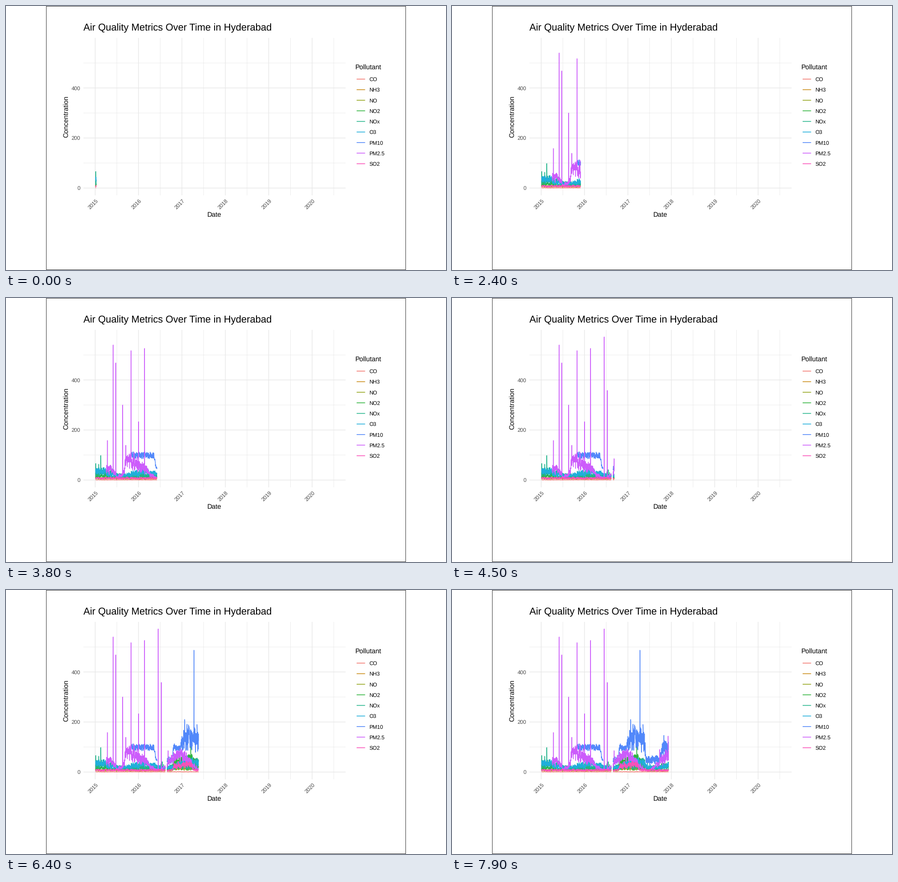
A matplotlib script that plays this animation: 966x580 px, repeating every 8000 ms.

```python
import numpy as np
import matplotlib.pyplot as plt
from matplotlib.animation import FuncAnimation
from matplotlib.patches import Rectangle

W, H, DPI = 966, 580, 100
FRAMES, INTERVAL = 80, 100
PT = 72 / DPI                       # points per pixel
X2015, YEAR = 195.7, 95.27          # pixel column of 2015, pixels per year
Y0, UNIT = 399.9, 0.5495            # pixel row of zero, pixels per unit
START, SPEED = 198.0, 3.51          # reveal front, pixels per frame
OUTAGE_END = 606                    # day on which the sensors come back

plt.rcParams["font.family"] = "Liberation Sans"
plt.rcParams["text.hinting"] = "none"

day = np.arange(3, 1085)
t = day / 365
xs = X2015 + YEAR * t


def during(a, b):
    """Soft on/off window between two times in years."""
    return (np.tanh((t - a) / 0.02) - np.tanh((t - b) / 0.02)) / 2


def season(peak):
    return np.cos(2 * np.pi * (t - peak))


def measure(level, spread, rng, gusts=0.0, since=0, outage=590, peaks=()):
    """Daily readings: a level with fast and slow noise, gusts and peaks."""
    n = len(day)
    slow = np.interp(day, day[::5], rng.uniform(-1, 1, len(day[::5])))
    noise = 0.7 * rng.uniform(-1, 1, n) + 0.45 * slow
    v = level * np.maximum(1 + spread * noise, 0.05)
    v *= np.where(rng.random(n) < gusts, rng.uniform(1.2, 2, n), 1)
    for d, top in peaks:
        v[d - day[0]] = top
    v[(day < since) | ((day > outage) & (day < OUTAGE_END))] = np.nan
    return Y0 - UNIT * v


# The polluted spell from late 2016 to spring 2017 shows in most series.
spell = during(1.79, 2.4)
late = during(2.75, 3.2)
SERIES = {
    "CO": ("#F2756D", dict(level=0.8, spread=0.8)),
    "NH3": ("#CB8E1B", dict(level=6.5 + 19 * spell, spread=0.4)),
    "NO": ("#93A61C", dict(level=8 + 6 * spell, spread=0.6, gusts=0.01)),
    "NO2": ("#2FB43C", dict(
        level=13 + 4 * season(0.1) + 30 * spell + 12 * late,
        spread=0.55, gusts=0.02)),
    "NOx": ("#22B48A", dict(
        level=17 + 12 * during(-0.1, 0.45) + 6 * spell + 6 * late,
        spread=0.65, gusts=0.05, peaks=[(6, 66), (48, 98)])),
    "O3": ("#20AEDB", dict(
        level=25 + 8 * season(0.12) + 9 * during(2, 2.4), spread=0.55)),
    "PM10": ("#5288FA", dict(
        level=48 + 51 * during(0.7, 1.38) + 51 * spell
        + 42 * during(2, 2.4) + 52 * late,
        spread=0.17 + 0.25 * during(1.6, 1.78) + 0.28 * during(2, 3.2),
        since=304, outage=520, peaks=[(831, 487)])),
    "PM2.5": ("#CC5CFB", dict(
        level=36 + 28 * season(0.95) + 26 * during(0.26, 0.47)
        + 32 * during(0.68, 0.83),
        spread=0.5, gusts=0.03, since=93,
        peaks=[(103, 158), (152, 540), (174, 468), (232, 300), (302, 517),
               (365, 233), (416, 526), (531, 572), (557, 358)])),
    "SO2": ("#FA50B8", dict(
        level=7.5 + 20 * during(1.8, 2.25), spread=0.6)),
}

fig = plt.figure(figsize=(W / DPI, H / DPI), dpi=DPI, facecolor="white")
ax = fig.add_axes([0, 0, 1, 1])
ax.set(xlim=(0, W), ylim=(H, 0))
ax.axis("off")


def stroke(x, y, color, px, z):
    return ax.plot(x, y, color=color, lw=px * PT, zorder=z, snap=False,
                   solid_capstyle="butt", solid_joinstyle="round")[0]


def label(x, y, s, px, color="black", **kw):
    ax.text(x, y, s, fontsize=px * PT, color=color, va="baseline",
            rotation_mode="anchor", **kw)


ax.add_patch(Rectangle((88.5, 0.5), 789, 579, fill=False, ec="#333333",
                       lw=PT, zorder=5, snap=False))

LEFT, RIGHT, TOP, BOTTOM = 170, 745.6, 70, 416
GREY, TICK = "#E8E8E8", "#4D4D4D"
for i in range(6):
    x = X2015 + YEAR * i
    stroke([x, x], [TOP, BOTTOM], GREY, 1.43, 1)
    stroke([x + YEAR / 2] * 2, [TOP, BOTTOM], GREY, 0.8, 0)
    label(x - 2.6, 438, str(2015 + i), 11.8, TICK, ha="center", rotation=45)
for v in range(0, 600, 100):
    y = Y0 - UNIT * v
    major = v % 200 == 0
    stroke([LEFT, RIGHT], [y, y], GREY, 1.43 if major else 0.8, int(major))
    if major:
        label(163.5, y + 4.3, str(v), 11.8, TICK, ha="right")

label(169.7, 54, "Air Quality Metrics Over Time in Hyderabad", 21.52)
label(457.8, 463, "Date", 14.76, ha="center")
label(137, 242.8, "Concentration", 14.76, ha="center", rotation=90)
label(766.9, 140, "Pollutant", 14.76)

lines = []
for i, (name, (color, params)) in enumerate(SERIES.items()):
    y = 160.6 + 23.24 * i
    stroke([769.8, 788.4], [y, y], color, 1.6, 3)
    label(797.4, y + 4.4, name, 11.8)
    ys = measure(rng=np.random.default_rng(40 + i), **params)
    lines.append((stroke([], [], color, 1.43, 3 + i / 10), ys))


def update(frame):
    front = START + SPEED * frame
    n = np.searchsorted(xs, front)
    for line, ys in lines:
        tip = np.interp(front, xs, ys)
        line.set_data(np.append(xs[:n], front), np.append(ys[:n], tip))
    return [line for line, _ in lines]


anim = FuncAnimation(fig, update, frames=FRAMES, interval=INTERVAL,
                     repeat=True, repeat_delay=0, blit=False)
plt.show()
```
